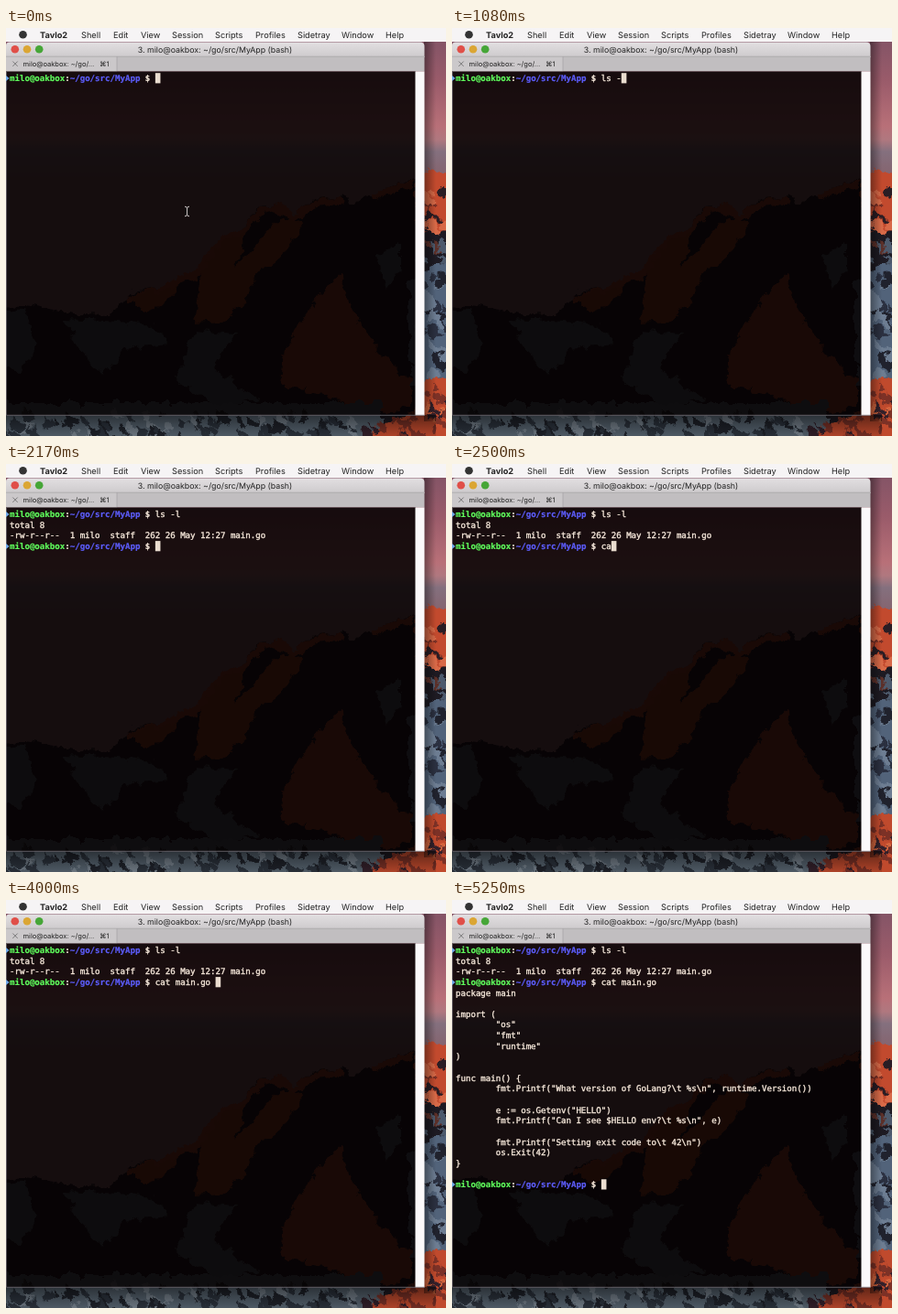
Write an HTML page that moves like this. It is 480 px wide and 446 px high and loops after 8 s.

```html
<!DOCTYPE html>
<html lang="en">
<head>
<meta charset="utf-8">
<title>Terminal session</title>
<style>
  html, body { margin: 0; width: 100%; height: 100%; overflow: hidden; background: #111; }
  svg { display: block; width: 100vw; height: 100vh; }
  text { white-space: pre; text-rendering: geometricPrecision; }
  .ui { font-family: Inter, Roboto, "DejaVu Sans", sans-serif; fill: #222; }
  .term { font: 9.1px "DejaVu Sans Mono", "Liberation Mono", monospace; fill: #f8eadc; stroke: #f8eadc; stroke-width: .35; }
  .prompt { font-weight: bold; stroke-width: .2; }
  .user { fill: #5ffa5c; stroke: #5ffa5c; }
  .path { fill: #5c5cf8; stroke: #5c5cf8; }
</style>
</head>
<body>
<svg viewBox="0 0 480 446" preserveAspectRatio="none">
  <defs>
    <linearGradient id="sky" x2="0" y2="1">
      <stop offset="0" stop-color="#7d5265"/>
      <stop offset=".35" stop-color="#9a5b6a"/>
      <stop offset=".65" stop-color="#b87078"/>
      <stop offset=".74" stop-color="#b0787f"/>
      <stop offset=".82" stop-color="#84707e"/>
      <stop offset="1" stop-color="#86626c"/>
    </linearGradient>
    <linearGradient id="bar" x2="0" y2="1">
      <stop offset="0" stop-color="#e2dfe1"/>
      <stop offset="1" stop-color="#cdcacc"/>
    </linearGradient>
    <linearGradient id="shadeX">
      <stop offset="0" stop-opacity=".4"/>
      <stop offset="1" stop-opacity="0"/>
    </linearGradient>
    <linearGradient id="shadeY" x2="0" y2="1">
      <stop offset="0" stop-opacity=".5"/>
      <stop offset="1" stop-opacity=".1"/>
    </linearGradient>
    <filter id="rough" x="-5%" y="-5%" width="110%" height="110%" color-interpolation-filters="sRGB">
      <feTurbulence type="fractalNoise" baseFrequency=".08" numOctaves="4" seed="4"/>
      <feDisplacementMap in="SourceGraphic" scale="14" xChannelSelector="R" yChannelSelector="G"/>
    </filter>
  </defs>

  <rect width="480" height="165" fill="url(#sky)"/>
  <rect y="164" width="480" height="282" fill="#86626c"/>
  <g filter="url(#rough)">
    <path fill="#1d1a22" d="M-20 302 20 303 80 313 115 314 135 289 165 284 210 264 235 230 265 212 275 195 295 192 310 202 335 188 365 184 380 190 410 177 446 165 462 157 500 160V470H-20Z"/>
    <path fill="none" stroke="#a8432c" stroke-width="8" d="M132 296 165 288 212 266 238 232 268 215 278 199 294 196 310 206 335 193 365 188M400 184 446 170"/>
    <path fill="#a04028" d="M136 292 165 287 190 280 168 305 145 310ZM212 268 240 232 262 222 250 262 265 245 290 215 310 206 325 215 300 250 272 270 262 300 235 320 205 322Z"/>
    <path fill="#a8432c" d="M364 268 374 300 400 345 440 385 440 415 390 420 350 402 300 392 303 350 335 302Z"/>
    <path fill="#4d5766" d="M-20 306 20 308 35 345 15 380-20 350ZM62 318 110 320 160 325 178 345 130 350 105 380 80 350ZM205 330 250 335 225 372 275 405 230 415 185 385ZM405 250 430 235 430 262 415 285Z"/>
    <path fill="#c24a2e" d="M448 161 462 155 500 160V206L476 222 448 214Z"/>
    <path fill="#52637a" d="M440 276 462 262 500 248V392H440Z"/>
    <path fill="#56636f" d="M-20 410H410V470H-20Z"/>
    <path fill="#c04a2d" d="M448 388 466 380 500 394V470H385L402 436 448 420Z"/>
    <g id="shards"></g>
  </g>
  <rect x="456" y="15" width="13" height="415" fill="url(#shadeX)"/>
  <rect y="423" width="469" height="23" fill="url(#shadeY)"/>

  <rect width="480" height="15" fill="#f6f4f5"/>
  <circle cx="18.5" cy="7.3" r="4.3" fill="#333"/>
  <g id="menu" class="ui" font-size="9.2"></g>

  <path fill="url(#bar)" d="M0 32V19Q0 15.5 4 15.5H452Q456.5 15.5 456.5 20V32Z"/>
  <circle cx="9.8" cy="23.3" r="4.3" fill="#e04f48"/>
  <circle cx="23" cy="23.3" r="4.3" fill="#dba634"/>
  <circle cx="36.2" cy="23.3" r="4.3" fill="#46a637"/>
  <text class="ui" x="228" y="26.5" font-size="8.8" text-anchor="middle">3. milo@oakbox: ~/go/src/MyApp (bash)</text>
  <rect y="31" width="456.5" height="16.5" fill="#c1bec0"/>
  <rect y="31" width="121" height="16.5" fill="#cbc8ca"/>
  <path d="M0 31.2H456.5M121 31V47.5" stroke="#a5a2a4" stroke-width=".7"/>
  <path d="M7.3 36.5 12.7 41.9M12.7 36.5 7.3 41.9" stroke="#666" stroke-width=".8"/>
  <text class="ui" x="18.5" y="42" font-size="7.5">milo@oakbox: ~/go/…</text>
  <text class="ui" x="102" y="42" font-size="7.5">⌘1</text>

  <rect y="47.5" width="447" height="376" fill="#040101" opacity=".865"/>
  <rect x="446.5" y="47.5" width="10" height="376" fill="#fbf9fa"/>
  <path d="M.4 48V423.3H456.5" fill="none" stroke="#77727a" stroke-width=".8"/>
  <g id="screen"></g>
  <rect id="cursor" width="5.6" height="11.2" fill="#eaddcf"/>
  <path id="beam" d="M195 195.2Q197.500 195.200 197.500 197V204Q197.500 205.800 195 205.800M200 195.200Q197.500 195.200 197.500 197M197.500 204Q197.500 205.800 200 205.800" fill="none" stroke="#c9c4c4"/>
</svg>
<script>
const LOOP = 8000, CELL = 5.478, ROW = 11.64, LEFT = 4, TOP = 49.2;
const $ = id => document.getElementById(id);

const menu = [["Tavlo2", 37], ["Shell", 82], ["Edit", 117], ["View", 147], ["Session", 181],
  ["Scripts", 228], ["Profiles", 272], ["Sidetray", 318], ["Window", 366], ["Help", 414]];
$("menu").innerHTML = menu.map(([label, x], i) =>
  `<text x="${x}" y="10.7"${i ? "" : ' font-weight="700"'}>${label}</text>`).join("");

// Slanted cracks and ledges over the rock and snow
let seed = 11;
const rand = () => (seed = seed * 16807 % 2147483647) / 2147483647;

function scatter(count, x, y, w, h, size, colors) {
  let out = "";
  for (let i = 0; i < count; i++) {
    const len = size * (.6 + rand()), thick = size * (.15 + rand() * .3);
    const fill = colors[Math.floor(rand() * colors.length)];
    out += `<path fill="${fill}" d="M${x + rand() * w} ${y + rand() * h}l${len * .7} ${len * .6} ${-thick} ${thick} ${-len * .5} ${-len * .2}z"/>`;
  }
  return out;
}
$("shards").innerHTML =
  scatter(14, 448, 172, 30, 44, 12, ["#2a1d24", "#7c3126", "#d86a48"]) +
  scatter(10, 448, 212, 30, 40, 14, ["#4d5a6c", "#5c3029"]) +
  scatter(26, 446, 266, 32, 108, 15, ["#20222d", "#2b3040", "#6d7d92"]) +
  scatter(16, 448, 382, 30, 56, 12, ["#33202a", "#7c3126", "#d9683f"]) +
  scatter(90, -10, 416, 400, 26, 13, ["#1f222a", "#2c333d", "#76818c"]) +
  scatter(12, 385, 420, 66, 24, 12, ["#33202a", "#7c3126"]);

const PROMPT = 29;
const listing = ["total 8", "-rw-r--r--  1 milo  staff  262 26 May 12:27 main.go"];
const program = String.raw`package main

import (
        "os"
        "fmt"
        "runtime"
)

func main() {
        fmt.Printf("What version of GoLang?\t %s\n", runtime.Version())

        e := os.Getenv("HELLO")
        fmt.Printf("Can I see $HELLO env?\t %s\n", e)

        fmt.Printf("Setting exit code to\t 42\n")
        os.Exit(42)
}
`.split("\n");

// Each entry: start time and what stands on the command line
const first = [[0, ""], [420, "l"], [750, "ls"], [920, "ls "], [1000, "ls -"], [1170, "ls -l"]];
const second = [[0, ""], [2250, "c"], [2420, "ca"], [2580, "cat"], [2750, "cat "], [3080, "cat M"],
  [3500, "cat "], [3750, "cat m"], [3830, "cat ma"], [3920, "cat main.go "]];
const LIST_AT = 1420, CAT_AT = 4170;
const typed = (steps, t) => steps.filter(s => s[0] <= t).pop()[1];

const escape = s => s.replace(/&/g, "&amp;").replace(/</g, "&lt;");
const line = (s, row, col = 0) =>
  `<text class="term" x="${LEFT + col * CELL}" y="${TOP + row * ROW + 8.8}">${escape(s)}</text>`;

function command(s, row) {
  const y = TOP + row * ROW;
  return `<path fill="#6fa8e8" d="M0 ${y + 2.8}l3.6 3-3.6 3z"/>
    <text class="term prompt" x="${LEFT}" y="${y + 8.8}"><tspan class="user">milo@oakbox</tspan>:<tspan class="path">~/go/src/MyApp</tspan> $</text>`
    + line(s, row, PROMPT);
}

let shown = "";
function draw(t) {
  let row = 0, input = typed(first, t), html = command(input, 0);
  if (t >= LIST_AT) {
    html += listing.map((s, i) => line(s, i + 1)).join("");
    row = 3;
    input = typed(second, t);
    html += command(input, row);
  }
  if (t >= CAT_AT) {
    html += program.map((s, i) => line(s, i + 4)).join("");
    row = 22;
    input = "";
    html += command(input, row);
  }
  if (html !== shown) $("screen").innerHTML = shown = html;
  $("cursor").setAttribute("x", LEFT + (PROMPT + input.length) * CELL);
  $("cursor").setAttribute("y", TOP + row * ROW);
  $("beam").setAttribute("visibility", t < 420 ? "visible" : "hidden");
}

const start = performance.now();
function tick() {
  draw((performance.now() - start) % LOOP);
  requestAnimationFrame(tick);
}
tick();
</script>
</body>
</html>
```
